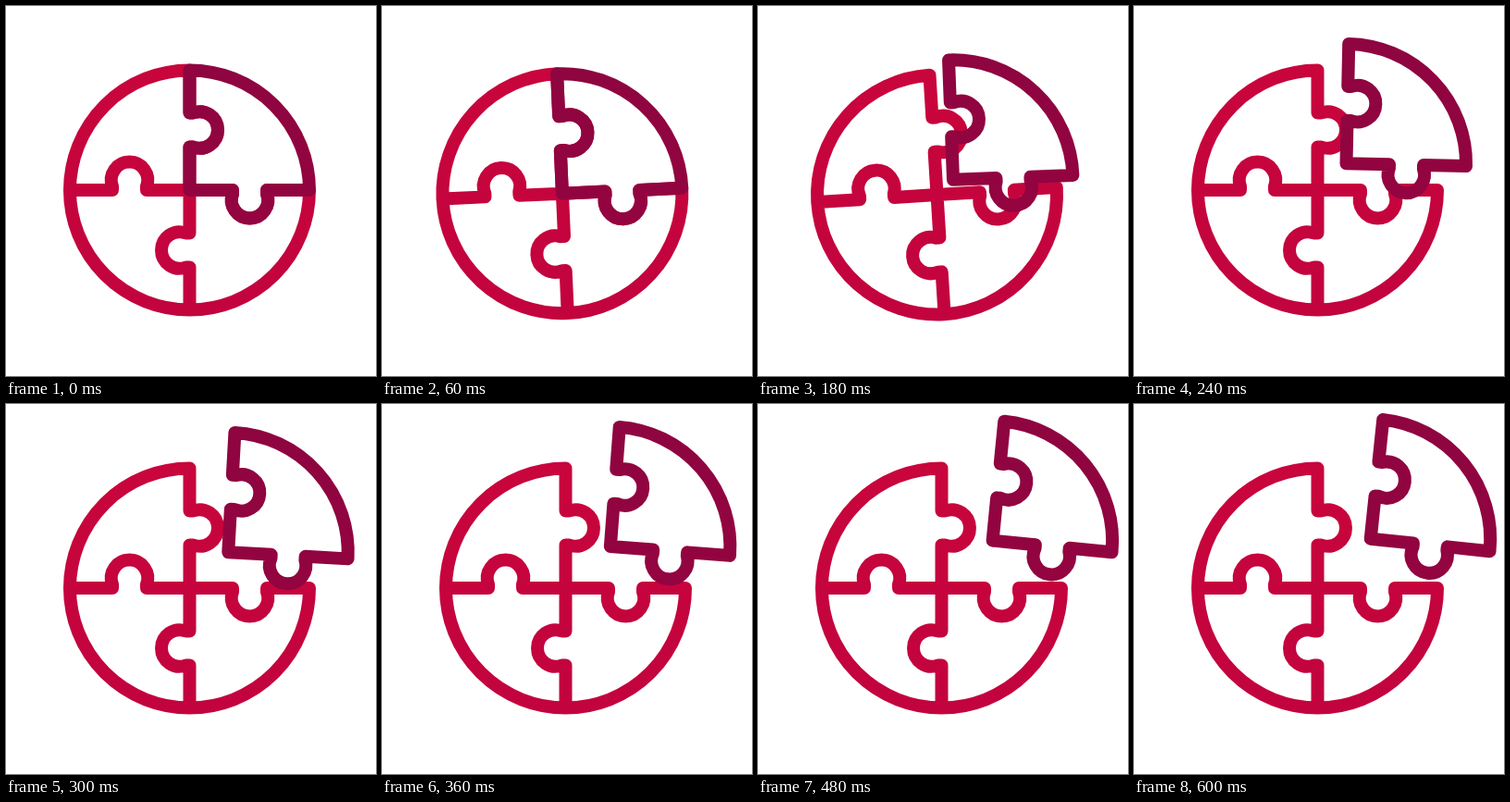
An HTML page with a canvas that plays this animation: 400 px wide and 400 px high, repeating every 0.63 s.

```html
<!DOCTYPE html>
<html lang="en">
<head>
<meta charset="utf-8">
<title>Puzzle circle</title>
<style>
  html, body { margin: 0; width: 100%; height: 100%; overflow: hidden; background: #fff; }
  canvas { display: block; }
</style>
</head>
<body>
<canvas width="400" height="400"></canvas>
<script>
const ctx = document.querySelector('canvas').getContext('2d');
const LOOP = 630, PEAK = 135, SETTLE = 240;
const RADIUS = 129.5;

// Poses relative to the resting centre; angles in degrees.
const REST = { x: 0, y: 0, angle: 0 };
const WINDUP = { x: -8.4, y: 8.5, angle: -6 };
const AWAY = { x: 57.3, y: -53.4, angle: 6 };

// One edge from the centre upwards, with a round knob to its right.
const spoke = new Path2D(
  `M0 0V-46.5H4A19.7 19.7 0 1 0 4 -83.5H0V${-RADIUS}`);

function outline(arc, spokeAngles) {
  const path = new Path2D(`M${RADIUS} 0A${RADIUS} ${RADIUS} 0 ${arc} 0 ${-RADIUS}`);
  for (const angle of spokeAngles) path.addPath(spoke, new DOMMatrix().rotate(angle));
  return path;
}

function gradient(from, to) {
  const g = ctx.createLinearGradient(0, -RADIUS, 0, RADIUS);
  g.addColorStop(0, from);
  g.addColorStop(1, to);
  return g;
}

const body = { path: outline('1 1', [0, 90, 180, 270]), color: gradient('#c8053c', '#c2033e') };
const piece = { path: outline('0 0', [0, 90]), color: gradient('#8e0540', '#960340') };

const clamp = v => Math.min(1, Math.max(0, v));
const smooth = v => v * v * (3 - 2 * v);
const bezier = (a, b, s) => 3 * (1 - s) * (1 - s) * s * a + 3 * (1 - s) * s * s * b + s ** 3;

// Fast start, long soft landing.
function glide(v) {
  let lo = 0, hi = 1;
  for (let i = 0; i < 20; i++) {
    const mid = (lo + hi) / 2;
    if (bezier(0.14, 0.25, mid) < v) lo = mid; else hi = mid;
  }
  return bezier(0.5, 1, lo);
}

function mix(a, b, p) {
  const lerp = key => a[key] + (b[key] - a[key]) * p;
  return { x: lerp('x'), y: lerp('y'), angle: lerp('angle') };
}

function draw({ path, color }, { x, y, angle }) {
  ctx.save();
  ctx.translate(198.5 + x, 199 + y);
  ctx.rotate(angle * Math.PI / 180);
  ctx.strokeStyle = color;
  ctx.stroke(path);
  ctx.restore();
}

function frame() {
  const t = performance.now() % LOOP;
  const windup = mix(REST, WINDUP, smooth(clamp(t / PEAK)));
  const back = smooth(clamp((t - PEAK) / (SETTLE - PEAK)));
  const leave = glide(clamp((t - PEAK) / (LOOP - PEAK)));

  ctx.clearRect(0, 0, 400, 400);
  ctx.lineWidth = 14;
  ctx.lineCap = ctx.lineJoin = 'round';
  draw(body, mix(windup, REST, back));
  draw(piece, mix(windup, AWAY, leave));
  requestAnimationFrame(frame);
}
frame();
</script>
</body>
</html>
```
